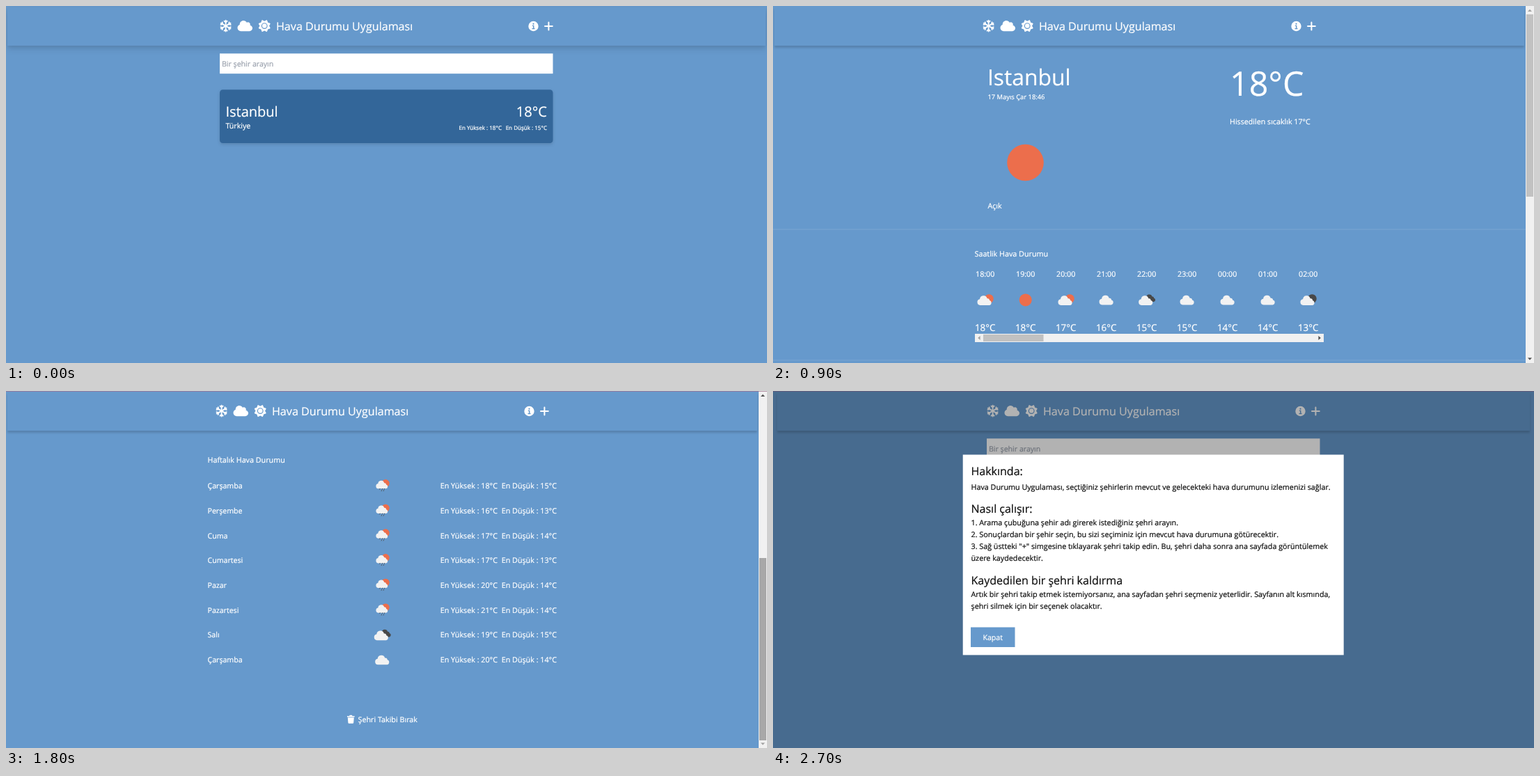
Animation of 1093x513 px, one loop 3600 ms. Source, as an HTML page:

```html
<!DOCTYPE html>
<html lang="tr">
<head>
<meta charset="utf-8">
<title>Hava Durumu Uygulaması</title>
<style>
  html, body { margin: 0; width: 100%; height: 100%; overflow: hidden; background: #69c; }
  svg { display: block; width: 1093px; height: 513px; }
  text { font-family: "Open Sans", "Noto Sans", sans-serif; text-rendering: geometricPrecision; white-space: pre; }
  .soft { filter: drop-shadow(0 5px 4px rgba(0,0,0,.1)) drop-shadow(0 2px 2px rgba(0,0,0,.06)); }
  .tight { filter: drop-shadow(0 3px 1.5px rgba(0,0,0,.15)); }
  .card { filter: drop-shadow(0 2px 2px rgba(0,0,0,.13)); }
</style>
</head>
<body>
<svg id="stage" viewBox="0 0 1093 513"></svg>
<script>
const BLUE = '#6699cc', SUN = '#ec6e4c', DARK = '#484848', PALE = '#f2f2f2';
const BODY = 10.6, NUMERIC = 10.75, TITLE = 16.1;

const text = (x, y, str, size = BODY, anchor = 'start', fill = '#fff') =>
  `<text x="${x}" y="${y}" font-size="${size}" text-anchor="${anchor}" fill="${fill}" stroke="${fill}" stroke-width=".22">${str}</text>`;
const rect = (x, y, w, h, fill, extra = '') =>
  `<rect x="${x}" y="${y}" width="${w}" height="${h}" fill="${fill}" ${extra}/>`;
const circle = (x, y, r, fill, extra = '') => `<circle cx="${x}" cy="${y}" r="${r}" fill="${fill}" ${extra}/>`;
const path = (d, fill, extra = '') => `<path d="${d}" fill="${fill}" ${extra}/>`;
const group = (x, y, content, scale = 1) =>
  `<g transform="translate(${x} ${y}) scale(${scale})">${content}</g>`;
const repeat = (n, fn) => Array.from({ length: n }, (_, i) => fn(i)).join('');

// Header icons
function snowflake(x, y) {
  const arm = i => path('M0 0V-8M-2.1-7L0-5L2.1-7', 'none',
    `transform="rotate(${i * 60})" stroke="#fff" stroke-width="1.8" stroke-linecap="round"`);
  return group(x, y, repeat(6, arm));
}
function sunIcon(x, y) {
  const points = Array.from({ length: 16 }, (_, i) => {
    const r = i % 2 ? 8.7 : 6.4, a = i * Math.PI / 8;
    return `${(r * Math.sin(a)).toFixed(2)},${(r * Math.cos(a)).toFixed(2)}`;
  }).join(' ');
  return group(x, y, `<polygon points="${points}" fill="#fff" stroke="#fff" stroke-linejoin="round"/>` +
    circle(0, 0, 3.85, 'none', `stroke="${BLUE}" stroke-width="1.2"`));
}
const cloudIcon = (x, y) => group(x, y, path('M0 336c0 80 64 144 144 144H512c71 0 128-57 128-128c0-62-44-114-102-125' +
  'c4-11 6-23 6-35c0-53-43-96-96-96c-20 0-38 6-53 16C367 64 315 32 256 32C168 32 96 104 96 192v8C40 220 0 273 0 336z', '#fff'), .0336);
const infoIcon = (x, y) => circle(x, y, 7.2, '#fff') + circle(x, y - 3.3, 1.1, BLUE) +
  path(`M${x - 1.7} ${y - .6}h1.9v4M${x - 2} ${y + 3.5}h4`, 'none', `stroke="${BLUE}" stroke-width="1.4"`);
const plusIcon = (x, y) =>
  path(`M${x - 5.4} ${y}h10.8M${x} ${y - 5.4}v10.8`, 'none', 'stroke="#fff" stroke-width="2" stroke-linecap="round"');

function header(dx, width, inset, shadow) {
  return rect(inset, 2, width - 2 * inset, 55, BLUE, `class="${shadow}"`) +
    group(dx, 0, snowflake(315.6, 28.6) + cloudIcon(332.5, 20) + sunIcon(371.2, 28.6) +
      text(388, 35, 'Hava Durumu Uygulaması', TITLE) + infoIcon(757.5, 29) + plusIcon(779.4, 29));
}

// Weather icons, placed by the centre of their cell
const cloud = (x, y, scale = 1, fill = PALE) => group(x, y,
  path('M4.5 14A4.4 4.4 0 0 1 4 5.3A5.4 5.4 0 0 1 14.6 4.3A3 3 0 0 1 18 7A3.6 3.6 0 0 1 17.6 14Z', fill), scale);
const weather = {
  clear: (x, y) => circle(x, y, 9, SUN),
  few: (x, y, fill = SUN) => circle(x + 5.6, y - 1.8, 6.4, fill) + cloud(x - 11.7, y - 6.4),
  night: (x, y) => weather.few(x, y, DARK),
  cloudy: (x, y) => cloud(x - 10.6, y - 7),
  broken: (x, y) => cloud(x - 3.6, y - 8.2, .78, DARK) + cloud(x - 12, y - 6.5),
  rain: (x, y) => circle(x + 4.8, y - 4, 5.6, SUN) + cloud(x - 9.3, y - 8, .84) +
    path(`M${x - 3} ${y + 3.4}l-.8 1.6m4.4-1.6l-.8 1.6m3.8-1.6l-.8 1.6m-3.3 .8l-.8 1.6m3.8-1.6l-.8 1.6`, 'none',
      `stroke="${DARK}" stroke-width=".9"`),
};

// Scrollbars
const arrow = (x, y, angle, active) =>
  path('M-3 1.6h6l-3-3.4z', active ? '#505050' : '#a3a3a3', `transform="translate(${x} ${y}) rotate(${angle})"`);
const scrollbar = (top, fill, atTop) => rect(1081, 0, 12, 513, '#f1f1f1') + rect(1082, top, 10, 262, fill) +
  arrow(1087, 6.5, 0, !atTop) + arrow(1087, 507, 180, atTop);
const divider = y => rect(0, y, 1081, 1, '#fff', 'opacity=".13"');

function home(inset, shadow) {
  return header(0, 1093, inset, shadow) +
    rect(307, 68.3, 478.5, 28.9, '#fff') + text(310, 87, 'Bir şehir arayın', BODY, 'start', '#9ca3af') +
    rect(307, 120.3, 478.5, 76.7, '#336699', 'rx="4.3" class="card"') +
    text(315.5, 159, 'Istanbul', 20) + text(315.5, 176, 'Türkiye') +
    text(777, 159, '18°C', 20.1, 'end') +
    text(712, 178, 'En Yüksek : 18°C', 8.06, 'end') + text(777, 178, 'En Düşük : 15°C', 8.06, 'end');
}

function today() {
  const temps = [18, 18, 17, 16, 15, 15, 14, 14, 13];
  const icons = ['few', 'clear', 'few', 'cloudy', 'broken', 'cloudy', 'cloudy', 'cloudy', 'night'];
  const hour = i => {
    const x = 304.7 + 58 * i;
    return text(x, 389, `${String((18 + i) % 24).padStart(2, '0')}:00`, 10.7, 'middle') +
      weather[icons[i]](x, 422.4) + text(x, 467, `${temps[i]}°C`, 13.4, 'middle');
  };
  return header(-6, 1081, 2, 'tight') +
    text(308, 114, 'Istanbul', 31.8) + text(308.5, 134, '17 Mayıs Çar 18:46', 9.35) +
    text(656, 129, '18°C', 48.4) + text(656, 170, 'Hissedilen sıcaklık 17°C', 10.7) +
    circle(362.5, 225, 26.3, SUN) + text(308.5, 291, 'Açık') + divider(320.5) +
    text(289.5, 360, 'Saatlik Hava Durumu', NUMERIC) + repeat(9, hour) +
    rect(290, 471, 501, 12, '#f1f1f1') + rect(302, 472, 86.5, 10, '#c1c1c1') +
    arrow(296, 477, -90, false) + arrow(785, 477, 90, true) +
    divider(508.5) + scrollbar(12, '#c1c1c1', true);
}

function week() {
  const days = [
    ['Çarşamba', 18, 15], ['Perşembe', 16, 13], ['Cuma', 17, 14], ['Cumartesi', 17, 13],
    ['Pazar', 20, 14], ['Pazartesi', 21, 14], ['Salı', 19, 15], ['Çarşamba', 20, 14],
  ];
  const row = ([day, high, low], i) => {
    const y = 140.3 + 35.68 * i, icon = ['rain', 'broken', 'cloudy'][Math.max(0, i - 5)];
    return text(289.5, y, day) + weather[icon](540.3, y - 3.7) +
      text(706, y, `En Yüksek : ${high}°C`, NUMERIC, 'end') + text(791, y, `En Düşük : ${low}°C`, NUMERIC, 'end');
  };
  const trash = path('M490 467h3l.8-1.2h3l.8 1.2h3v1.5h-10.6zM490.8 469.2h9l-.6 7.3q-.1 1.2-1.2 1.2h-5.4q-1.1 0-1.2-1.2z', '#fff');
  return header(-6, 1081, 2, 'tight') + text(289.5, 103, 'Haftalık Hava Durumu', NUMERIC) +
    days.map(row).join('') + trash + text(505.5, 476.3, 'Şehri Takibi Bırak', NUMERIC) +
    scrollbar(240, '#a8a8a8', false) + rect(0, 0, 1093, 1, '#a0708c', 'opacity=".7"');
}

function about() {
  const heading = (y, str) => text(284.5, y, str, 16, 'start', '#111');
  const lines = (y, ...rows) => rows.map((str, i) => text(284.5, y + 17.1 * i, str, NUMERIC, 'start', '#111')).join('');
  return home(6, 'tight') + rect(0, 0, 1093, 513, '#000', 'opacity=".3"') +
    rect(0, 0, 1093, 1, '#5f5c7c') + rect(272.7, 91.5, 547, 287.9, '#fff') +
    heading(121, 'Hakkında:') +
    lines(142, 'Hava Durumu Uygulaması, seçtiğiniz şehirlerin mevcut ve gelecekteki hava durumunu izlemenizi sağlar.') +
    heading(175, 'Nasıl çalışır:') +
    lines(193, '1. Arama çubuğuna şehir adı girerek istediğiniz şehri arayın.',
      '2. Sonuçlardan bir şehir seçin, bu sizi seçiminiz için mevcut hava durumuna götürecektir.',
      '3. Sağ üstteki "+" simgesine tıklayarak şehri takip edin. Bu, şehri daha sonra ana sayfada görüntülemek',
      'üzere kaydedecektir.') +
    heading(278, 'Kaydedilen bir şehri kaldırma') +
    lines(295.7, 'Artık bir şehri takip etmek istemiyorsanız, ana sayfadan şehri seçmeniz yeterlidir. Sayfanın alt kısmında,',
      'şehri silmek için bir seçenek olacaktır.') +
    rect(284, 339.5, 63.5, 28.5, BLUE) + text(315.7, 358, 'Kapat', BODY, 'middle');
}

const HOLD = 900;
const stage = document.getElementById('stage');
stage.innerHTML = [home(2, 'soft'), today(), week(), about()].map(scene => `<g>${scene}</g>`).join('');
const scenes = [...stage.children];

function draw() {
  const current = Math.floor(performance.now() / HOLD) % scenes.length;
  scenes.forEach((scene, i) => { scene.style.display = i === current ? '' : 'none'; });
  requestAnimationFrame(draw);
}
draw();
</script>
</body>
</html>
```
